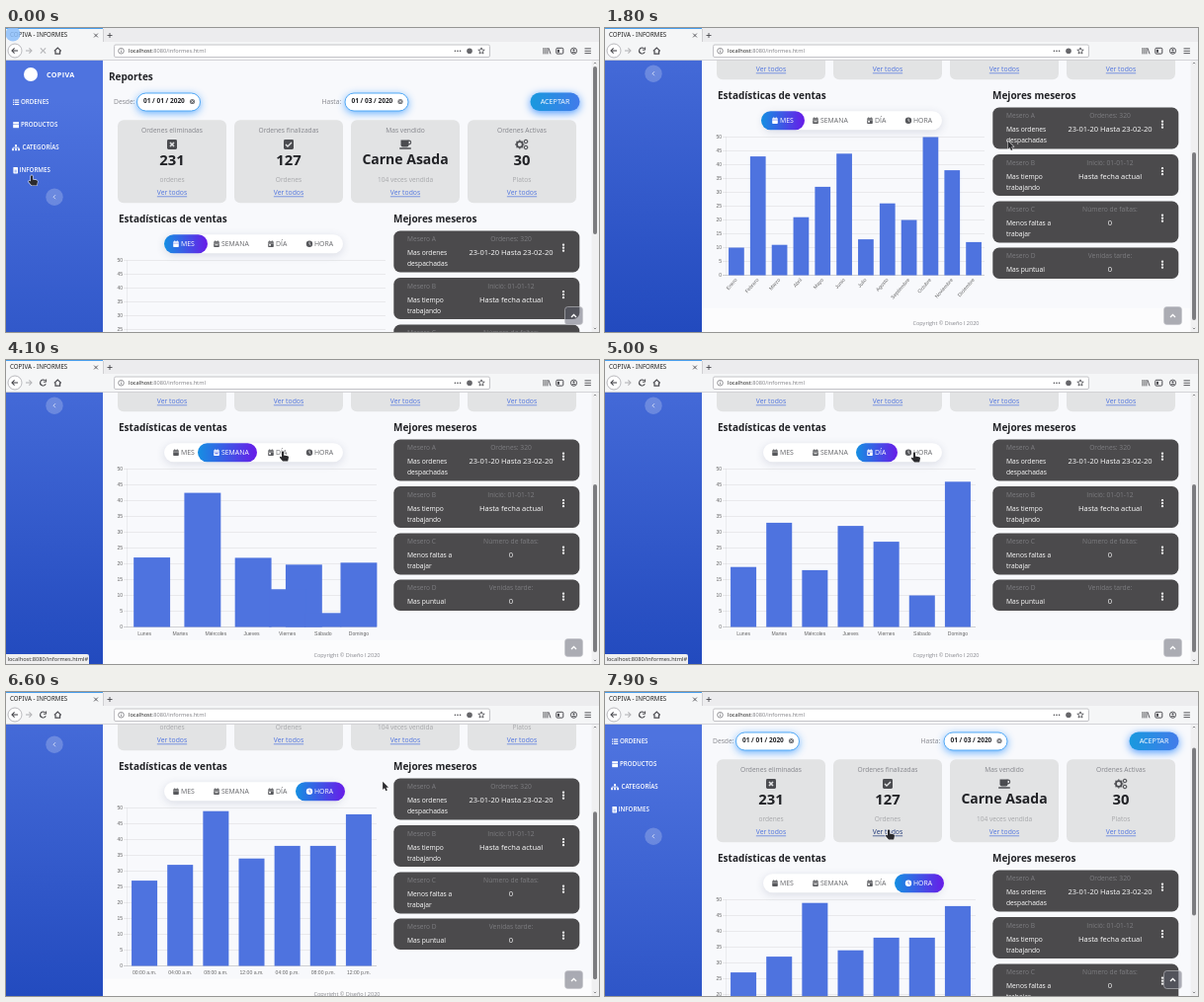
These frames come from a looping animation (600x308 px, 8000 ms). An HTML page with a canvas:

```html
<!DOCTYPE html>
<html lang="es">
<head>
<meta charset="utf-8">
<title>Informes</title>
<style>
html, body { margin: 0; width: 600px; height: 308px; overflow: hidden; background: #f8f9fc; }
canvas { display: block; }
</style>
</head>
<body>
<canvas id="stage" width="600" height="308"></canvas>
<script>
const ctx = document.getElementById('stage').getContext('2d');
const LOOP = 8000, TOP = 33;
const UI = '"Open Sans", sans-serif';
const CHROME = '"Noto Sans", sans-serif';
const CHART = '"Liberation Sans", sans-serif';
const BLUE = '#4e73df', INK = '#212226', GRAY = '#85868c';

const clamp = v => Math.max(0, Math.min(1, v));
const mix = (a, b, p) => a + (b - a) * p;
const smooth = p => p * p * (3 - 2 * p);
const outQuart = p => 1 - (1 - clamp(p)) ** 4;

// Interpolates rows of [time, ...values].
function track(keys, t) {
  const i = keys.findIndex(k => k[0] > t);
  if (i === 0) return keys[0].slice(1);
  if (i < 0) return keys[keys.length - 1].slice(1);
  const a = keys[i - 1], b = keys[i];
  const p = smooth((t - a[0]) / (b[0] - a[0]));
  return a.slice(1).map((v, n) => mix(v, b[n + 1], p));
}

function text(str, x, y, size, color = INK, { align = 'left', weight = 400, family = UI, spacing = 0 } = {}) {
  ctx.font = `${weight} ${size}px ${family}`;
  ctx.letterSpacing = spacing + 'px';
  ctx.textAlign = align;
  ctx.textBaseline = 'middle';
  ctx.fillStyle = color;
  ctx.fillText(str, x, y);
  return ctx.measureText(str).width;
}

function rect(x, y, w, h, color) {
  ctx.fillStyle = color;
  ctx.fillRect(x, y, w, h);
}

function round(x, y, w, h, r, fill, stroke, shadow) {
  ctx.save();
  if (shadow) { ctx.shadowColor = shadow; ctx.shadowBlur = 8; ctx.shadowOffsetY = 2; }
  ctx.beginPath();
  ctx.roundRect(x, y, w, h, r);
  ctx.fillStyle = fill;
  ctx.fill();
  ctx.restore();
  if (stroke) { ctx.strokeStyle = stroke; ctx.lineWidth = 1; ctx.stroke(); }
}

function disc(x, y, r, fill) {
  ctx.beginPath();
  ctx.arc(x, y, r, 0, 7);
  ctx.fillStyle = fill;
  ctx.fill();
}

function ring(x, y, r, color, width = 1, from = 0, to = 7) {
  ctx.beginPath();
  ctx.arc(x, y, r, from, to);
  ctx.strokeStyle = color;
  ctx.lineWidth = width;
  ctx.stroke();
}

function line(points, color, width = 1) {
  ctx.beginPath();
  points.forEach(([x, y]) => ctx.lineTo(x, y));
  ctx.strokeStyle = color;
  ctx.lineWidth = width;
  ctx.stroke();
}

function cross(x, y, r, color, width = 1) {
  line([[x - r, y - r], [x + r, y + r]], color, width);
  line([[x - r, y + r], [x + r, y - r]], color, width);
}

function sweep(x0, x1, from, to) {
  const g = ctx.createLinearGradient(x0, 0, x1, 0);
  g.addColorStop(0, from);
  g.addColorStop(1, to);
  return g;
}

// ---- icons ----
const icons = {
  list(x, y, c) {
    for (const d of [-2.2, 0, 2.2]) { rect(x - 3, y + d - .5, 1.2, 1.1, c); rect(x - 1.2, y + d - .5, 4.4, 1.1, c); }
  },
  box(x, y, c) { rect(x - 2.8, y - 3, 5.8, 2.3, c); rect(x - 2.8, y - .2, 5.8, 3.2, c); },
  tree(x, y, c) {
    rect(x - 1, y - 3, 2, 2, c);
    for (const d of [-3, 0, 3]) rect(x + d - 1, y + 1, 2, 2, c);
    line([[x - 3, y + 1], [x - 3, y], [x + 3, y], [x + 3, y + 1]], c, .7);
    line([[x, y - 1], [x, y + 1]], c, .7);
  },
  file(x, y, c) {
    round(x - 2.6, y - 3.2, 4.6, 6.4, .6, c);
    line([[x - 1.4, y], [x + .9, y]], BLUE, .6);
    line([[x - 1.4, y + 1.6], [x + .9, y + 1.6]], BLUE, .6);
  },
  calendar(x, y, c, mark) {
    round(x - 2.8, y - 2.4, 5.6, 5.6, .7, c);
    rect(x - 1.7, y - 3.3, .9, 1.3, c);
    rect(x + .8, y - 3.3, .9, 1.3, c);
    rect(x - 2.8, y - .9, 5.6, .5, mark);
  },
  week(x, y, c, mark) {
    icons.calendar(x, y, c, mark);
    rect(x - 1.6, y + .6, 3.2, 1, mark);
  },
  day(x, y, c, mark) {
    icons.calendar(x, y, c, mark);
    rect(x - 1.8, y + .3, 1.7, 1.7, mark);
  },
  clock(x, y, c, mark) {
    disc(x, y, 3.2, c);
    line([[x, y - 2], [x, y + .2], [x + 1.3, y + 1]], mark, .7);
  },
  remove(x, y, c) { round(x - 5, y - 5, 10, 10, 1.4, c); cross(x, y, 2, '#e2e3e4', 1.6); },
  check(x, y, c) {
    round(x - 5, y - 5, 10, 10, 1.4, c);
    line([[x - 3, y], [x - 1, y + 2], [x + 3, y - 2]], '#e2e3e4', 1.4);
  },
  cup(x, y, c) {
    round(x - 4.5, y - 4.5, 8, 7, [0, 0, 2, 2], c);
    ring(x + 3.8, y - 2, 1.9, c, 1.1);
    round(x - 6, y + 3.3, 12, 1.5, .7, c);
  },
  gears(x, y, c) {
    for (const [dx, dy, r] of [[-2.2, 0, 2.9], [4, -3, 1.6], [4, 3, 1.6]]) {
      ring(x + dx, y + dy, r, c, r * .6);
      for (let i = 0; i < 8; i++) {
        const a = i * Math.PI / 4;
        disc(x + dx + Math.cos(a) * r * 1.4, y + dy + Math.sin(a) * r * 1.4, r * .24, c);
      }
    }
  }
};

// ---- timeline ----
const scrollKeys = [[940, 0], [1200, 67], [1650, 125], [6520, 125], [6600, 118], [7050, 70], [7550, 25]];
const cursorKeys = [
  [100, 26, 149], [900, 318, 142], [1350, 319, 141], [1900, 416, 112], [2250, 416, 100], [2750, 183, 91],
  [2980, 183, 91], [3100, 243, 90], [3930, 239, 90], [4100, 280, 92], [4900, 278, 92], [5000, 313, 93],
  [5900, 315, 93], [6350, 382, 90], [6900, 380, 92], [7650, 290, 138], [7900, 287, 139]
];
const pillKeys = [[0, 160], [1200, 158], [2900, 158], [3050, 155]];
const topButtonKeys = [[0, 1], [350, 1], [750, 0], [1150, 0], [1250, .12], [1650, 1]];

const days = ['Lunes', 'Martes', 'Miércoles', 'Jueves', 'Viernes', 'Sábado', 'Domingo'];
const months = ['Enero', 'Febrero', 'Marzo', 'Abril', 'Mayo', 'Junio', 'Julio', 'Agosto',
  'Septiembre', 'Octubre', 'Noviembre', 'Diciembre'];
const hours = ['00:00 a.m.', '04:00 a.m.', '08:00 a.m.', '12:00 a.m.', '04:00 p.m.', '08:00 p.m.', '12:00 p.m.'];
const charts = [
  { at: 120, base: 375, right: 384, labels: months, data: [10, 43, 11, 21, 32, 44, 13, 26, 20, 50, 38, 12] },
  { at: 3000, base: 395, right: 375, labels: [1, 2, 3, 4].map(n => 'Semana ' + n), data: [24.4, 50, 25, 10] },
  { at: 3965, base: 395, right: 375, labels: days, data: [19, 33, 18, 32, 27, 10, 46] },
  { at: 5060, base: 395, right: 375, labels: hours, data: [27, 32, 49, 34, 38, 38, 48] }
];
const tabs = [
  { name: 'MES', icon: 'calendar', x: 172, from: 160, w: 44, at: 0 },
  { name: 'SEMANA', icon: 'week', x: 213, from: 194, w: 60, at: 3930 },
  { name: 'DÍA', icon: 'day', x: 268, from: 254, w: 42, at: 4930 },
  { name: 'HORA', icon: 'clock', x: 307, from: 293, w: 50, at: 5850 }
];
const cards = [
  ['Ordenes eliminadas', 'remove', '231', 'ordenes'],
  ['Ordenes finalizadas', 'check', '127', 'Ordenes'],
  ['Mas vendido', 'cup', 'Carne Asada', '104 veces vendida'],
  ['Ordenes Activas', 'gears', '30', 'Platos']
];
const waiters = [
  ['A', 205, 'Ordenes: 320', '23-01-20 Hasta 23-02-20', 'Mas ordenes', 'despachadas'],
  ['B', 252.5, 'Inició: 01-01-12', 'Hasta fecha actual', 'Mas tiempo', 'trabajando'],
  ['C', 300, 'Número de faltas:', '0', 'Menos faltas a', 'trabajar'],
  ['D', 347, 'Venidas tarde:', '0', 'Mas puntual']
];
const current = (list, t) => list.reduce((n, item, i) => item.at <= t ? i : n, 0);

// ---- page ----
function sidebar() {
  const g = ctx.createLinearGradient(0, TOP, 0, 433);
  g.addColorStop(.1, BLUE);
  g.addColorStop(1, '#224abe');
  rect(0, TOP - 2, 98, 404, g);
  disc(25, 46.5, 7, '#fff');
  text('COPIVA', 41, 47.3, 7.2, '#fff', { weight: 700, spacing: .35 });
  [['list', 'ORDENES'], ['box', 'PRODUCTOS'], ['tree', 'CATEGORÍAS'], ['file', 'INFORMES']].forEach(([icon, name], i) => {
    const y = 74.7 + i * 23;
    icons[icon](10, y, '#fff');
    text(name, icon === 'tree' ? 16.5 : icon === 'file' ? 13.5 : 15, y, 6.2, '#fff', { weight: 600 });
  });
  disc(49, 170.7, 8.7, 'rgba(255,255,255,.22)');
  line([[50, 168.7], [48, 170.7], [50, 172.7]], 'rgba(255,255,255,.65)', 1);
}

function dateField(label, x, value) {
  text(label, x, 74.3, 6.7, GRAY);
  round(x + 23.5, 65.5, 64, 18, 9, '#fff', '#55aaf5', 'rgba(50,150,255,.8)');
  text(value, x + 30, 74.2, 6.5, INK, { weight: 700 });
  disc(x + 79.5, 74, 2.6, '#747579');
  cross(x + 79.5, 74, 1, '#fff', .8);
}

function filters() {
  text('Reportes', 104, 49.5, 10, INK, { weight: 700 });
  dateField('Desde:', 109, '01 / 01 / 2020');
  dateField('Hasta:', 319.5, '01 / 03 / 2020');
  round(530.5, 65, 50, 18.5, 9.2, sweep(530, 581, '#1899de', '#427bea'), null, 'rgba(50,140,255,.9)');
  text('ACEPTAR', 555.5, 74.6, 7.2, '#fff', { align: 'center' });
}

function summary(t) {
  const center = { align: 'center' };
  cards.forEach(([title, icon, value, unit], i) => {
    const x = 113 + i * 118, mid = x + 55;
    round(x, 92.7, 110, 84, 6, '#e2e3e4');
    text(title, mid, 103.3, 6.65, GRAY, center);
    icons[icon](mid, 117.5, '#4b4c50');
    text(value, mid, 134.2, i === 2 ? 14 : 14.8, INK, { align: 'center', weight: 700 });
    text(unit, mid, 153.3, 6.6, '#a6a7aa', center);
    const color = i === 1 && t > 7700 ? '#1c3576' : BLUE;
    const w = text('Ver todos', mid, 167, 6.8, color, center);
    rect(mid - w / 2, 170, w, .7, color);
  });
}

function tabBar(t) {
  round(160, 208.7, 181, 19, 9.5, '#fff', null, 'rgba(60,70,110,.17)');
  const active = current(tabs, t);
  tabs.forEach((tab, i) => {
    const on = i === active;
    const x = i ? tab.from : track(pillKeys, t)[0];
    if (on) round(x, 208.7, tab.w, 19, 9.5, sweep(x, x + tab.w, '#158fe2', '#681ce8'));
    icons[tab.icon](tab.x, 218.2, on ? '#fff' : '#57585c', on ? '#3f59e4' : '#fff');
    text(tab.name, tab.x + 5, 218.4, 6.9, on ? '#fff' : '#66676b');
  });
}

function layout(chart) {
  const pitch = (chart.right - 122) / chart.data.length;
  const unit = (chart.base - 235) / 50;
  return chart.data.map((v, i) => ({ x: 122 + pitch * (i + .5), w: pitch * .72, y: chart.base - v * unit, base: chart.base }));
}

function salesChart(t) {
  const n = current(charts, t), chart = charts[n];
  const step = (chart.base - 235) / 10;
  for (let i = 0; i <= 10; i++) {
    const y = 235 + i * step;
    rect(119, y - .25, chart.right - 119, .6, i === 10 ? 'rgba(0,0,0,.28)' : 'rgba(0,0,0,.11)');
    text(String(50 - i * 5), 118, y, 5, '#666', { align: 'right', family: CHART });
  }
  rect(122, 235, .5, chart.base - 235, 'rgba(0,0,0,.11)');

  const next = layout(chart), prev = n ? layout(charts[n - 1]) : [];
  const p = outQuart((t - chart.at) / 1000);
  next.forEach((bar, i) => {
    const old = prev[i] || { x: bar.x, w: n ? prev[0].w : bar.w, y: bar.base, base: bar.base };
    const w = mix(old.w, bar.w, p), y = mix(old.y, bar.y, p);
    rect(mix(old.x, bar.x, p) - w / 2, y, w, mix(old.base, bar.base, p) - y, BLUE);
    const style = { align: n ? 'center' : 'right', family: CHART };
    ctx.save();
    ctx.translate(bar.x, n ? 402.3 : 379);
    if (!n) ctx.rotate(-.85);
    text(chart.labels[i], 0, 0, 5.1, '#666', style);
    ctx.restore();
  });
}

function waiterList() {
  const center = { align: 'center' };
  waiters.forEach(([letter, y, note, value, ...reason]) => {
    round(392.3, y, 188, reason[1] ? 42 : 31.5, 6.5, '#4b4a4c');
    text('Mesero ' + letter, 406, y + 9, 6.6, '#7d7d80');
    text(note, 511, y + 9, 6.7, '#7d7d80', center);
    text(value, 511, y + 23, 7.5, '#fff', center);
    reason.forEach((s, i) => text(s, 406, y + 23.1 + i * 10.8, 6.7, '#fff'));
    for (const d of [-3, 0, 3]) disc(564, y + 17.2 + d, 1.15, '#fff');
  });
}

function page(t, scroll) {
  ctx.save();
  ctx.beginPath();
  ctx.rect(0, TOP - 1, 600, 308);
  ctx.clip();
  ctx.translate(0, .5 - scroll);
  rect(98, 0, 502, 440, '#f8f9fc');
  rect(98, 408, 502, 26, '#fcfcfd');
  sidebar();
  filters();
  summary(t);
  text('Estadísticas de ventas', 114, 193.7, 10, INK, { weight: 700 });
  text('Mejores meseros', 392, 193.7, 10, INK, { weight: 700 });
  tabBar(t);
  salesChart(t);
  waiterList();
  text('Copyright © Diseño l 2020', 345, 424.3, 5.5, GRAY, { align: 'center' });
  ctx.restore();
}

// ---- browser ----
function overlays(t, scroll) {
  ctx.globalAlpha = track(topButtonKeys, t)[0];
  round(565.5, 282.5, 18, 18, 3, 'rgba(90,92,105,.5)', 'rgba(195,195,200,.6)');
  line([[572, 293], [574.5, 290.5], [577, 293]], '#fff', 1.3);
  ctx.globalAlpha = 1;
  rect(592.5, TOP - 1, 7.5, 276, '#f0f0f1');
  round(594, 39 + scroll * .696, 4, 170, 2, '#7c7c7f');
  line([[594.8, 36.2], [596, 35], [597.2, 36.2]], '#77777a', .8);
  line([[594.8, 303.8], [596, 305], [597.2, 303.8]], '#77777a', .8);
  if (t > 2750 && t < 5950) {
    round(0, 298, 84, 10, [0, 2, 0, 0], '#efeff0');
    text('localhost:8080/informes.html#', 1.5, 303.7, 5.65, '#333', { family: CHROME });
  }
}

function browserBar(t) {
  const dark = '#4a4a4f', pale = '#b5b5b8', loading = t < 250;
  rect(0, 0, 600, 15, '#ececee');
  rect(0, 0, 98, 15, '#f5f6f7');
  rect(0, 0, 98, 1, '#4aa0ee');
  rect(98, 1, .7, 13, '#c4c4c8');
  line([[102.5, 7.5], [107.5, 7.5]], dark, .9);
  line([[105, 5], [105, 10]], dark, .9);
  rect(0, 14, 600, 18.5, '#f5f6f7');
  rect(0, 32, 600, .8, '#ccccd0');
  text('COPIVA - INFORMES', 4, 7.7, 6.2, '#222', { family: CHROME });
  if (t < 350) {
    ctx.globalAlpha = clamp((350 - t) / 250);
    disc(7, 6, 7.5, 'rgba(140,190,250,.85)');
    ctx.globalAlpha = 1;
  }
  cross(91, 7.5, 1.9, dark, .9);

  disc(9, 23, 7, '#fff');
  ring(9, 23, 7, '#a8a8ac', .8);
  line([[12, 23], [6, 23]], dark, 1.1);
  line([[8.6, 20.4], [6, 23], [8.6, 25.6]], dark, 1.1);
  line([[20, 23], [26, 23]], pale, 1.1);
  line([[23.4, 20.4], [26, 23], [23.4, 25.6]], pale, 1.1);
  if (loading) cross(37.5, 23, 2.6, pale, 1.1);
  else {
    ring(37.5, 23, 2.9, dark, 1.1, .4, 5.5);
    line([[40.6, 19.5], [40.6, 22.2], [38, 22.2]], dark, 1);
  }
  line([[48.8, 23.4], [52.3, 20], [55.8, 23.4]], dark, 1.2);
  line([[50, 23], [50, 26.2], [54.6, 26.2], [54.6, 23]], dark, 1.2);

  round(109.5, 17, 380, 12.5, 1.5, '#fff', '#c3c3c7');
  ring(116.5, 23.2, 2.8, '#77777b', .8);
  rect(116.1, 22.8, .8, 2, '#77777b');
  rect(116.1, 21.4, .8, .8, '#77777b');
  const w = text('localhost', 124, 23.5, 5.65, '#222', { family: CHROME });
  text(':8080/informes.html', 124 + w, 23.5, 5.65, '#85858a', { family: CHROME });
  for (const d of [-2.6, 0, 2.6]) disc(457 + d, 23.2, .8, dark);
  disc(469, 23.2, 2.8, '#66666a');
  ctx.beginPath();
  for (let i = 0; i < 10; i++) {
    const a = i * Math.PI / 5 - Math.PI / 2, r = i % 2 ? 1.5 : 3.4;
    ctx.lineTo(481 + Math.cos(a) * r, 23.3 + Math.sin(a) * r);
  }
  ctx.closePath();
  ctx.strokeStyle = dark;
  ctx.lineWidth = .8;
  ctx.stroke();

  for (const x of [543.5, 545.5, 547.5]) rect(x, 20, .9, 6.4, dark);
  line([[549, 20.3], [551, 26.3]], dark, .9);
  round(556.8, 20.3, 7, 5.8, 1, '#f5f6f7', dark);
  rect(558, 21.8, 2, 3, dark);
  ring(574.5, 23.2, 3.1, dark, .9);
  disc(574.5, 22.3, 1.1, dark);
  rect(572.7, 24.2, 3.6, 1, dark);
  for (const d of [-2.4, 0, 2.4]) rect(585.5, 22.8 + d, 6.4, .9, dark);
}

function cursor(t) {
  const [x, y] = track(cursorKeys, t);
  const hand = t < 250 || (t > 950 && t < 1450) || (t > 2700 && t < 6000) || t > 7550;
  ctx.save();
  ctx.translate(x, y);
  ctx.lineJoin = 'round';
  const shape = new Path2D(hand
    ? 'M-1 1Q0-.6 1 1V4.4L5 5.2Q6 5.5 6 6.5L5.2 10.5H0L-3 7Q-3.4 5.6-2 5.8L-1 6.6Z'
    : 'M0 0V8.2L1.9 6.5L3.2 9.4L4.7 8.7L3.4 5.9H5.9Z');
  ctx.strokeStyle = 'rgba(255,255,255,.75)';
  ctx.lineWidth = 1.2;
  ctx.stroke(shape);
  ctx.fillStyle = '#2b2b2e';
  ctx.fill(shape);
  ctx.restore();
}

function draw(t) {
  const [scroll] = track(scrollKeys, t);
  page(t, scroll);
  overlays(t, scroll);
  browserBar(t);
  cursor(t);
}

const start = performance.now();
function tick() {
  draw((performance.now() - start) % LOOP);
  requestAnimationFrame(tick);
}
tick();
</script>
</body>
</html>
```
